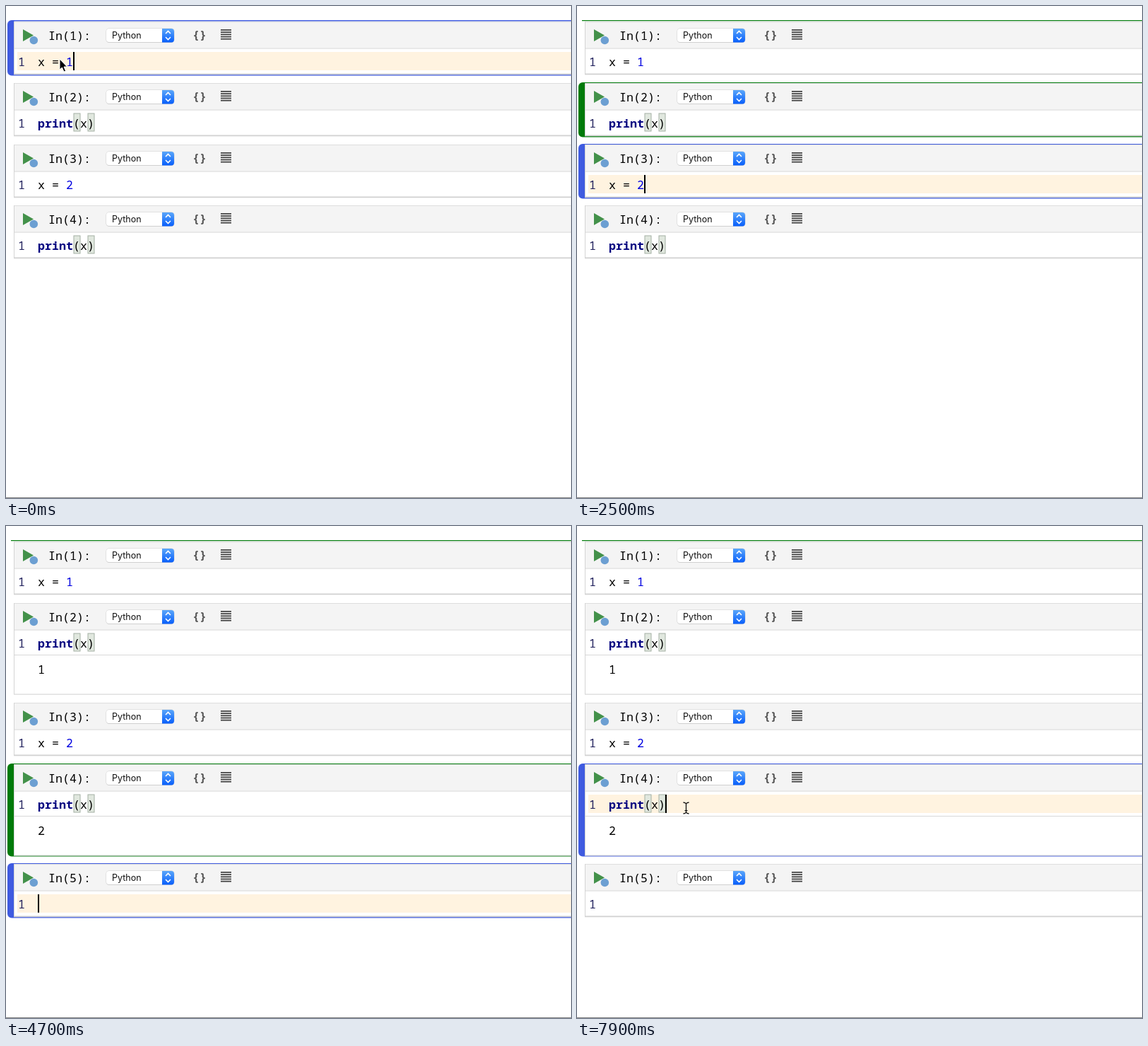
Animation of 800x696 px, one loop 8000 ms. Source, as an HTML page with a canvas:

```html
<!DOCTYPE html>
<html>
<head>
<meta charset="utf-8">
<style>
html, body { margin: 0; width: 100%; height: 100%; overflow: hidden; background: #fff; }
canvas { display: block; }
</style>
</head>
<body>
<canvas id="stage" width="800" height="696"></canvas>
<script>
const ctx = document.getElementById('stage').getContext('2d');
const LOOP = 8000, STEP = 100;
const MONO = '16.67px "Noto Sans Mono", monospace';
const BLUE = '#3f5be0', GREEN = '#007a0a';

// Each cell: code, when its output appears, and when it is marked as run
const cells = [
  { value: '1', ran: [1200, 2500] },
  { output: '1', shown: 2600, ran: [2500, 2700] },
  { value: '2', ran: [3400, 3600] },
  { output: '2', shown: 4700, ran: [4700, 4900] },
  { empty: true, from: 4700 }
];
// [time, selected cell, caret x]
const selections = [[0, 0, 95], [1200, 1, 125], [2500, 2, 95], [3400, 3, 115], [4700, 4, 45], [7800, 3, 125]];
const blinks = [500, 1000, 1700, 2200, 3000, 3400, 3900, 4400, 5200, 5700, 6200, 6600, 7100, 7600];

function rect(x, y, w, h, color) {
  ctx.fillStyle = color;
  ctx.fillRect(x, y, w, h);
}

function text(str, x, y, color, font = MONO) {
  ctx.font = font;
  ctx.fillStyle = color;
  ctx.fillText(str, x, y);
}

function round(x, y, w, h, r, fill) {
  ctx.beginPath();
  ctx.roundRect(x, y, w, h, r);
  ctx.fillStyle = fill;
  ctx.fill();
}

function shape(points, fill, stroke, width = 1, close = true) {
  ctx.beginPath();
  points.forEach(([x, y]) => ctx.lineTo(x, y));
  if (close) ctx.closePath();
  if (fill) { ctx.fillStyle = fill; ctx.fill(); }
  if (stroke) { ctx.strokeStyle = stroke; ctx.lineWidth = width; ctx.stroke(); }
}

function header(y, n) {
  rect(12, y + 2, 788, 37, '#f4f4f4');
  shape([[24, y + 12], [39, y + 20.5], [24, y + 29]], '#43914a');
  ctx.beginPath();
  ctx.arc(39.3, y + 27.5, 5.8, 0, 7);
  ctx.fillStyle = '#6c9fd2';
  ctx.fill();
  text(`In(${n}):`, 60, y + 26.5, '#000');

  round(141.5, y + 10.5, 97, 20.5, 4.5, '#d0d0d0');
  round(142, y + 11, 96, 19, 4, '#fff');
  text('Python', 150, y + 25, '#111', '12.5px Inter, sans-serif');
  const blue = ctx.createLinearGradient(0, y + 11, 0, y + 30);
  blue.addColorStop(0, '#5aa6fa');
  blue.addColorStop(1, '#0a60fb');
  round(221, y + 11, 17, 19.5, [0, 4, 4, 0], blue);
  for (const d of [-1, 1]) {
    const cy = y + 20.5 + d * 2.5;
    shape([[226, cy], [229.5, cy + d * 3.6], [233, cy]], null, '#fff', 1.5, false);
  }

  text('{}', 264, y + 26, '#555', 'bold ' + MONO);
  for (let i = 0; i < 5; i++) rect(304, y + 12 + i * 3.2, 15, 1.8, '#484848');
}

function code(cell, y, active) {
  const base = y + 63.6;
  if (active) rect(16, y + 44, 784, 26, '#fff3e0');
  text('1', 17, base, '#20205c');
  if (cell.value) {
    text('x =', 45, base, '#000');
    text(cell.value, 85, base, '#0000e0');
  } else if (!cell.empty) {
    for (const x of [95.5, 115.5]) {
      rect(x, y + 43.5, 10, 26, '#a3b0a3');
      rect(x + 1, y + 44.5, 8, 24, '#e1e8df');
    }
    text('print', 45, base, '#000080', 'bold ' + MONO);
    text('(x)', 95, base, '#000');
  }
}

function drawCell(cell, i, y, t, active) {
  const open = t >= cell.shown;
  const bottom = y + (open ? 131.5 : 77.5);
  const ran = cell.ran && t >= cell.ran[0] && t < cell.ran[1];
  const frame = active ? BLUE : ran ? GREEN : null;
  const top = i ? y : y - 1;
  if (frame) {
    round(2, top, 820, bottom - top, 6, frame);
    rect(11.5, top + 1.5, 800, bottom - top - 3, '#fff');
  } else if (!i) {
    rect(7, 20, 793, 1.2, GREEN);
  }
  rect(11, y + 1, 789, 1, '#dedede');
  rect(11, y + 1, 1, bottom - y - 2.5, '#d4d4d4');
  header(y, i + 1);
  rect(12, y + 38.5, 788, 1.2, '#dfdfdf');
  code(cell, y, active);
  if (open) {
    rect(12, y + 74, 788, 1, '#d8d8d8');
    text(cell.output, 45, y + 101.3, '#000');
    rect(11, y + 129.5, 789, 1.2, '#d8d8d8');
  } else {
    rect(11, y + 74.5, 789, 1.8, '#d2d2d2');
  }
}

function arrow(x, y) {
  const points = [[0, 0], [0, 15], [3.4, 12], [6, 18], [8.6, 17], [6, 11], [10.5, 11]];
  shape(points.map(([a, b]) => [x + a, y + b]), '#000', '#fff', 1);
}

function beam(x, y) {
  for (const d of [-1, 1]) {
    shape([[x - 4, y + d * 8], [x - 1.5, y + d * 7.5], [x, y + d * 6], [x, y]], null, '#111', 1.3, false);
    shape([[x + 4, y + d * 8], [x + 1.5, y + d * 7.5], [x, y + d * 6]], null, '#111', 1.3, false);
  }
  rect(x - 2, y + 3, 4, 1.2, '#111');
}

function pointer(t) {
  if (t < 100) arrow(76, 75);
  else if (t >= 7700) beam(154.5, 399);
  else if (t >= 6000) {
    const p = Math.min(1, (t - 6000) / 600);
    const e = p * p * (3 - 2 * p);
    arrow(82 + 74 * e, 97 + 323 * e);
  }
}

function draw(now) {
  const t = Math.floor(now % LOOP / STEP) * STEP;
  const [, selected, caret] = selections.filter(s => s[0] <= t).pop();
  rect(0, 0, 800, 696, '#fff');
  let pos = 21.4;
  cells.forEach((cell, i) => {
    if (t < cell.from) return;
    const y = Math.round(pos);
    drawCell(cell, i, y, t, i === selected);
    if (i === selected && blinks.filter(b => b <= t).length % 2 === 0) {
      rect(caret, y + 44, 2, 26, '#000');
    }
    pos += t >= cell.shown ? 141 : 86.6;
  });
  rect(0, 695, 800, 1, '#858585');
  pointer(t);
}

const start = performance.now();
function tick() {
  draw(performance.now() - start);
  requestAnimationFrame(tick);
}
tick();
</script>
</body>
</html>
```
